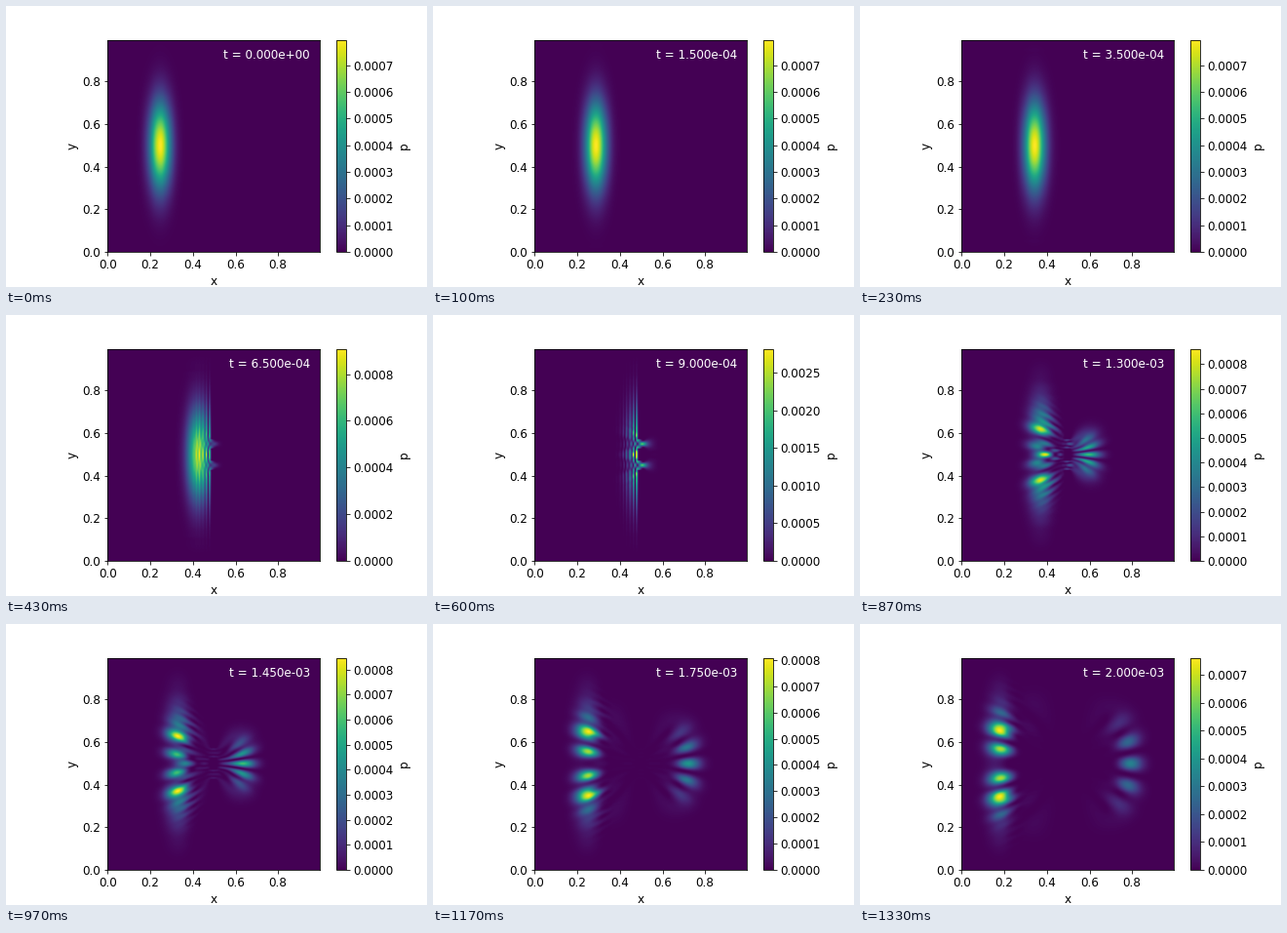
Write a matplotlib script that moves like this. It is 432x288 px and loops after 1.36 s.

```python
import numpy as np
from numpy.polynomial.chebyshev import chebinterpolate
import matplotlib.pyplot as plt
from matplotlib.animation import FuncAnimation
from matplotlib.colors import Normalize

plt.rcParams.update({"font.family": "DejaVu Sans", "font.size": 12,
                     "figure.subplot.bottom": 0.125})

# Wave packet hitting a double slit, on a unit box with zero boundaries
N = 200
H = 1 / N
DT = 2.5e-5
SUBSTEPS = 2
STATES = 41
TICK_MS = 10
TICKS = 136

idx = np.arange(1, N)
col, row = np.meshgrid(idx, idx)
off = abs(row - N // 2)
wall = (abs(col - N // 2) <= 2) & ((off <= 5) | (off >= 15))
free = np.where(wall, 0.0, 1.0)


def packet(xc=0.25, yc=0.5, sx=0.05, sy=0.2, px=200):
    x, y = col * H, row * H
    shape = -(x - xc) ** 2 / (2 * sx ** 2) - (y - yc) ** 2 / (2 * sy ** 2)
    u = np.zeros((N + 1, N + 1), complex)
    u[1:-1, 1:-1] = np.exp(shape + 1j * px * x) * free
    return u / np.sqrt(np.sum(abs(u) ** 2))


def hop(u):
    """Half-step Hamiltonian, shifted and scaled to the range [-1, 1]."""
    out = np.zeros_like(u)
    out[1:-1, 1:-1] = (u[2:, 1:-1] + u[:-2, 1:-1]
                       + u[1:-1, 2:] + u[1:-1, :-2]) * (-0.25 * free)
    return out


def cayley(x):
    a = 2 * DT / H ** 2 * (1 + x)
    return (1 - 1j * a) / (1 + 1j * a)


COEFS = chebinterpolate(cayley, 24)


def advance(u):
    """One Crank-Nicolson step as a Chebyshev series."""
    prev, cur = u, hop(u)
    total = COEFS[0] * prev + COEFS[1] * cur
    for c in COEFS[2:]:
        prev, cur = cur, 2 * hop(cur) - prev
        total += c * cur
    return total


def simulate():
    u = packet()
    states = []
    for _ in range(STATES):
        states.append(abs(u[1:-1, 1:-1]) ** 2)
        for _ in range(SUBSTEPS):
            u = advance(u)
    return states


density = simulate()

fig = plt.figure(figsize=(6, 4), dpi=72)
ax = fig.gca()
img = ax.imshow(density[0], extent=[0, 1 - H, 0, 1 - H], origin="lower",
                cmap="viridis", norm=Normalize(0, density[0].max()))
ax.set_xlabel("x")
ax.set_ylabel("y")
bar = fig.colorbar(img, ax=ax)
bar.set_label("p")
clock = ax.text(0.95, 0.95, "", color="white", ha="right", va="top")


def update(tick):
    # 30 states per second, rounded to 10 ms ticks
    k = int((tick + 0.5) * 0.3)
    img.set_norm(Normalize(0, density[k].max()))
    img.set_data(density[k])
    clock.set_text(f"t = {k * SUBSTEPS * DT:.3e}")
    return img, clock


anim = FuncAnimation(fig, update, frames=TICKS, interval=TICK_MS, repeat=True)
plt.show()
```
